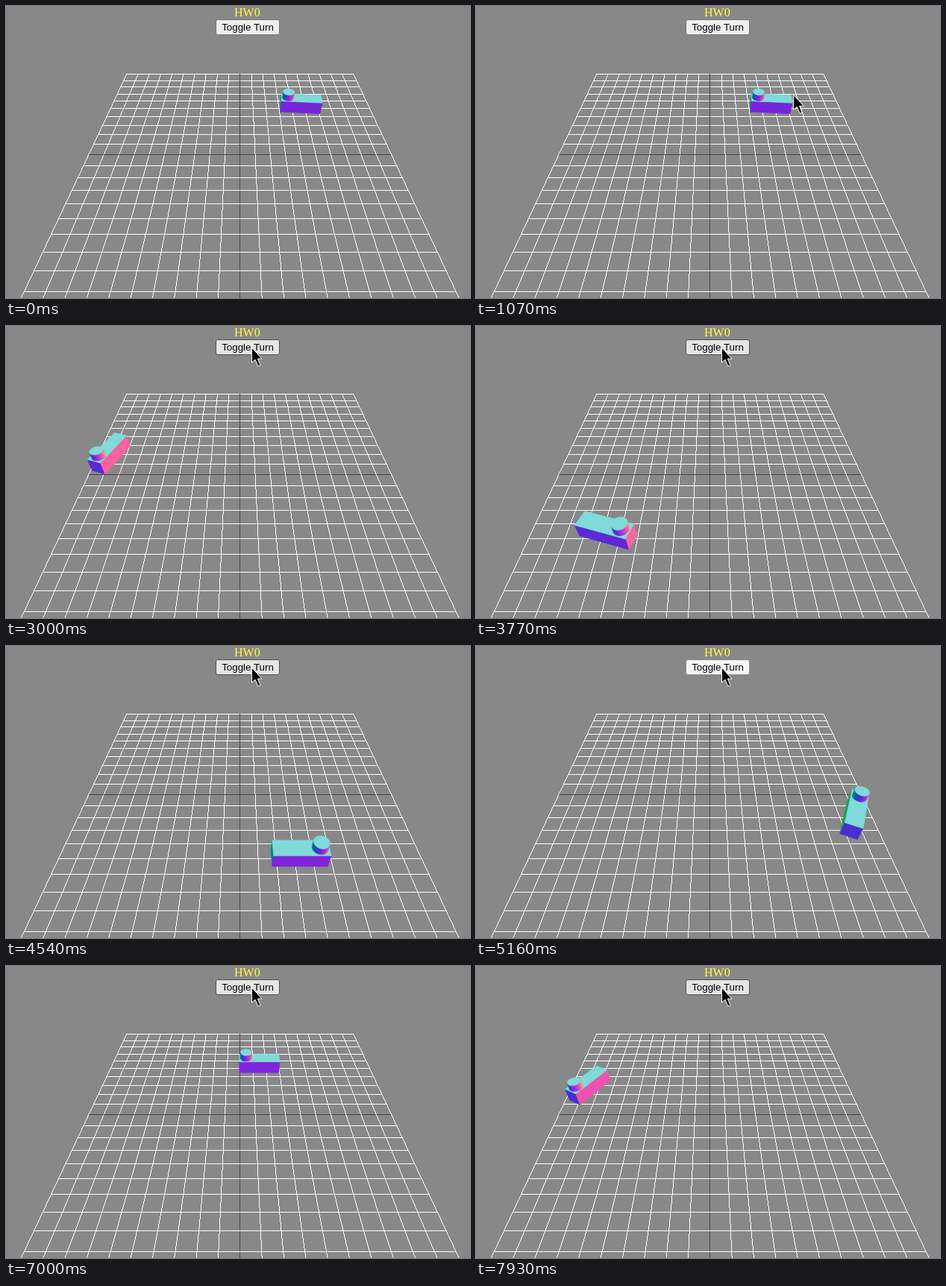
An HTML page with a canvas that plays this animation: 622 px wide and 392 px high, repeating every 8000 ms.

```html
<!DOCTYPE html>
<html lang="en">
<head>
<meta charset="utf-8">
<title>HW0</title>
<style>
  html, body { margin: 0; width: 622px; height: 392px; overflow: hidden; background: #888; }
  canvas, h1, #toggle { position: absolute; }
  canvas { left: 0; top: 0; }
  h1 { left: 306px; top: 0; margin: 0; font: 16px/18px "Liberation Serif", serif; color: #ff3; }
  #toggle {
    left: 281px; top: 18px; width: 86px; height: 21px; box-sizing: border-box;
    border: 1px solid #767676; border-radius: 3px; background: #efefef; color: #000;
    font: 13.333px/19px "Liberation Sans", sans-serif; text-align: center; white-space: nowrap;
  }
  #toggle.hover { background: #e5e5e5; border-color: #4f4f4f; }
  #toggle.press { background: #f5f5f5; border-color: #8d8d8d; }
</style>
</head>
<body>
<h1>HW0</h1>
<div id="toggle">Toggle Turn</div>
<canvas id="stage" width="622" height="392"></canvas>
<script>
const W = 622, H = 392, LOOP = 8000, FPS = 13;
const ctx = document.getElementById('stage').getContext('2d');
const button = document.getElementById('toggle');

// Camera at (0, 15, 15) looking at the origin.
const EYE = [0, 15, 15], FOCAL = 430, CX = 313.8, CY = 199.4;
function project([x, y, z]) {
  const k = FOCAL / (Math.hypot(...EYE) - (y + z) * Math.SQRT1_2);
  return [CX + x * k, CY - (y - z) * Math.SQRT1_2 * k];
}

// Colour from the view-space normal.
function normalColor([x, y, z]) {
  const view = [x, (y - z) * Math.SQRT1_2, (y + z) * Math.SQRT1_2];
  return `rgb(${view.map(v => Math.round((v * 0.5 + 0.5) * 255))})`;
}

// One-pixel line without smoothing.
function pixelLine(target, from, to) {
  const [x0, y0] = project(from), [x1, y1] = project(to);
  const n = Math.ceil(Math.max(Math.abs(x1 - x0), Math.abs(y1 - y0)));
  for (let i = 0; i <= n; i++) {
    target.fillRect(Math.floor(x0 + (x1 - x0) * i / n), Math.floor(y0 + (y1 - y0) * i / n), 1, 1);
  }
}

const grid = document.createElement('canvas');
grid.width = W;
grid.height = H;
const gridCtx = grid.getContext('2d');
for (let i = -10; i <= 10; i++) {
  gridCtx.fillStyle = i ? '#fff' : '#444';
  pixelLine(gridCtx, [-10, 0, i], [10, 0, i]);
  pixelLine(gridCtx, [i, 0, -10], [i, 0, 10]);
}

// Piecewise linear lookup in rows of [time, ...values].
function track(rows, t) {
  const i = rows.findIndex(row => row[0] > t);
  if (i < 0) return rows[rows.length - 1].slice(1);
  if (i === 0) return rows[0].slice(1);
  const a = rows[i - 1], b = rows[i], p = (t - a[0]) / (b[0] - a[0]);
  return a.slice(1).map((v, j) => v + (b[j + 1] - v) * p);
}

// Distance travelled; the car stands still before the first and after the second click.
const travel = [
  [1730, -0.4], [2000, 2.75], [2390, 7.5], [2930, 13.75], [3000, 14.6], [3230, 16.9],
  [4080, 25.95], [4540, 31.56], [4930, 35.9], [5240, 39.05], [5850, 39.05],
  [6080, 41.4], [6540, 46.05], [7000, 50.97], [7390, 55.72], [7930, 61.97], [8000, 62.8]
];
const pointer = [[230, 590, 382], [990, 450, 143], [1070, 427, 121], [1450, 329, 29]];
const presses = [[1610, 1720], [5150, 5235], [5765, 5850]];

// Oval track: two straights joined by half circles.
const HALF = 4.2, RADIUS = 5, SIDE = 2 * HALF + Math.PI * RADIUS;
function carPose(distance) {
  const lap = 2 * SIDE, u = (distance % lap + lap) % lap;
  const back = u >= SIDE, v = u % SIDE, sign = back ? -1 : 1;
  const turn = Math.max(0, v - 2 * HALF) / RADIUS;
  return {
    x: sign * (HALF - Math.min(v, 2 * HALF) - RADIUS * Math.sin(turn)),
    z: -sign * RADIUS * Math.cos(turn),
    angle: turn + (back ? Math.PI : 0)
  };
}

function fillFace(points, normal) {
  const facing = normal.reduce((sum, n, i) => sum + n * (EYE[i] - points[0][i]), 0);
  if (facing <= 0) return;
  ctx.fillStyle = ctx.strokeStyle = normalColor(normal);
  ctx.lineWidth = 0.5;
  ctx.beginPath();
  points.forEach(p => ctx.lineTo(...project(p)));
  ctx.closePath();
  ctx.fill();
  ctx.stroke();
}

// Upright prism over an outline of [forward, side] points; normalAt gives each wall's direction.
function drawPrism({ x, z, angle }, outline, y0, y1, normalAt) {
  const c = Math.cos(angle), s = Math.sin(angle);
  const rotate = ([f, n]) => [-f * c + n * s, f * s + n * c];
  const place = (p, y) => {
    const [dx, dz] = rotate(p);
    return [x + dx, y, z + dz];
  };
  outline.forEach((p, i) => {
    const q = outline[(i + 1) % outline.length];
    const [nx, nz] = rotate(normalAt(i));
    fillFace([place(p, y0), place(q, y0), place(q, y1), place(p, y1)], [nx, 0, nz]);
  });
  fillFace(outline.map(p => place(p, y1)), [0, 1, 0]);
}

const polar = (a, r = 1) => [r * Math.cos(a), r * Math.sin(a)];
const box = [[1.5, -0.5], [1.5, 0.5], [-1.5, 0.5], [-1.5, -0.5]];
const SEGMENTS = 32, STEP = 2 * Math.PI / SEGMENTS;
const disc = Array.from({ length: SEGMENTS }, (_, i) => {
  const [f, n] = polar(i * STEP, 0.42);
  return [f + 1, n];
});

function drawCar(pose) {
  drawPrism(pose, box, 0, 1, i => polar(i * Math.PI / 2));
  drawPrism(pose, disc, 1, 1.5, i => polar((i + 0.5) * STEP));
}

const arrow = new Path2D('M.5 0V20L5 16L8.8 25L12 23.6L8.3 15H14Z');
function drawPointer(x, y) {
  ctx.save();
  ctx.translate(x, y);
  ctx.fillStyle = '#000';
  ctx.strokeStyle = '#fff';
  ctx.lineWidth = 1;
  ctx.fill(arrow);
  ctx.stroke(arrow);
  ctx.restore();
}

function draw(t) {
  ctx.clearRect(0, 0, W, H);
  ctx.drawImage(grid, 0, 0);
  drawCar(carPose(track(travel, t)[0]));

  const [px, py] = track(pointer, t);
  if (t >= 230) drawPointer(px, py);
  const pressed = presses.some(([from, to]) => t >= from && t < to);
  button.className = pressed ? 'press' : px < 367 && py < 39 ? 'hover' : '';
}

let shown = -1;
function tick() {
  const step = Math.floor((performance.now() % LOOP + 8) * FPS / 1000);
  if (step !== shown) draw((shown = step) * 1000 / FPS);
  requestAnimationFrame(tick);
}
tick();
</script>
</body>
</html>
```
